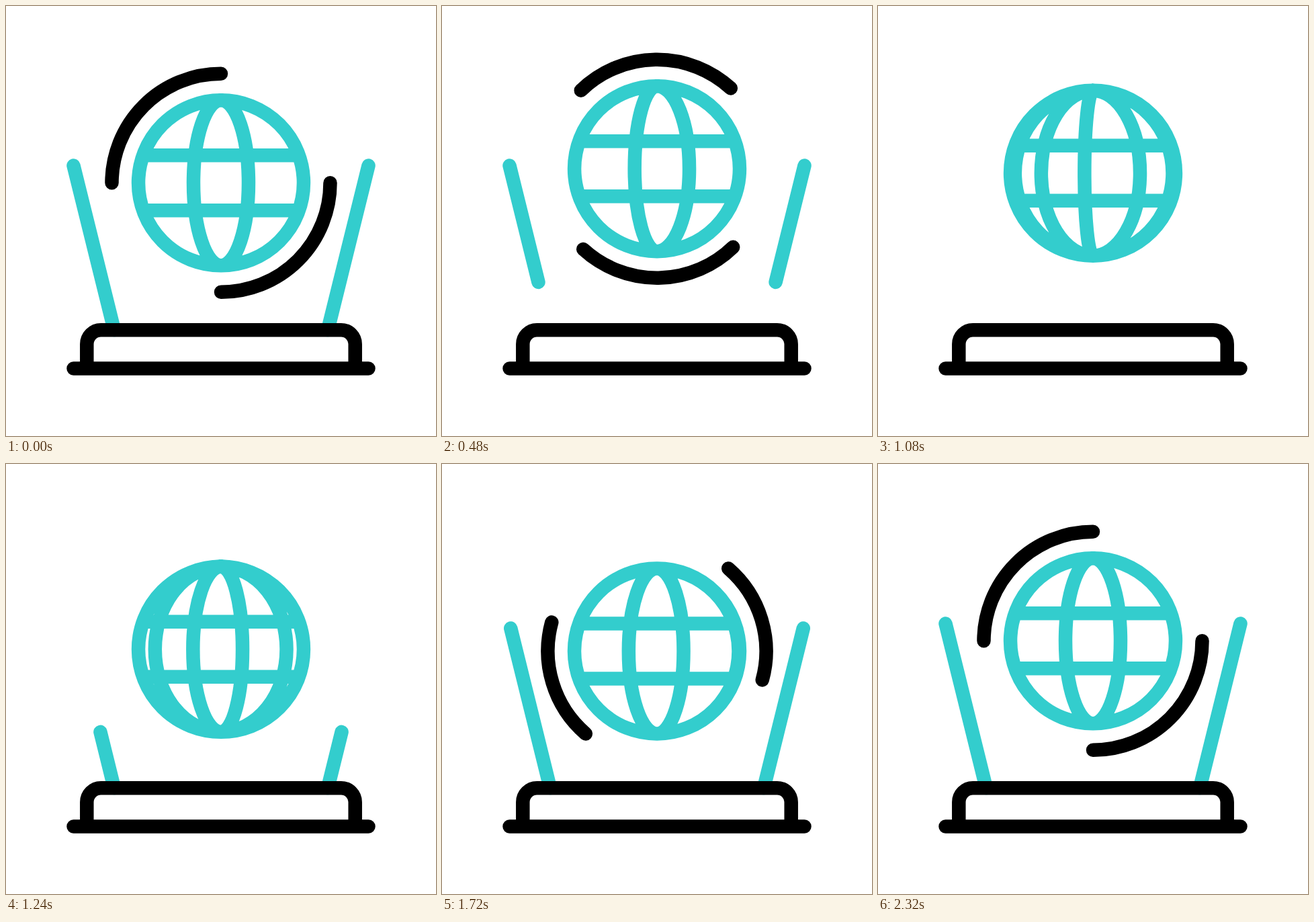
Animation of 640 by 640 pixels, one loop 2440 ms. Source, as an HTML page:

```html
<!DOCTYPE html>
<html lang="en">
<head>
<meta charset="utf-8">
<title>Spinning globe</title>
<style>
  html, body { margin: 0; width: 100%; height: 100%; overflow: hidden; background: #fff; }
  svg { display: block; width: 100vw; height: 100vh; }
  path { fill: none; stroke-width: 20.5; }
  .teal { stroke: #33cdcd; }
  .black { stroke: #000; }
  .round { stroke-linecap: round; }
</style>
</head>
<body>
<svg viewBox="0 0 640 640">
  <path id="rods" class="teal round"/>
  <path id="globe" class="teal"/>
  <path id="orbit" class="black round"/>
  <path class="black round" d="M120.3 539.5V503.5A21 21 0 0 1 141.3 482.3H498.7A21 21 0 0 1 519.7 503.5V539.5M100.5 539.5H539.5"/>
</svg>
<script>
const LOOP = 2440, STEP = 40, LAST = 2320;
const CX = 320, R = 123, ORBIT = 162.5, BAND = R / 3;
const $ = id => document.getElementById(id);
const rad = deg => deg * Math.PI / 180;
const span = (t, a, b) => Math.min(1, Math.max(0, (t - a) / (b - a)));
const smooth = x => x * x * (3 - 2 * x);
const easeIn = x => x ** 3;
const easeOut = x => 1 - (1 - x) ** 3;
const move = (t, from, to, start, end) => from + (to - from) * smooth(span(t, start, end));

// Two meridians leave over the right rim, one crosses, two arrive from the left
const meridians = t => [
  move(t, -BAND, R, 320, 1545),
  move(t, BAND, R, 320, 1205),
  move(t, -R, R, 470, 1780),
  move(t, -R, BAND, 706, 1780),
  move(t, -R, -BAND, 930, 1780)
];

function height(t) {
  if (t < 860) return move(t, 263.3, 225.3, 40, 860);
  return t < 1390 ? move(t, 225.3, 288, 860, 1390) : move(t, 288, 263.3, 1390, 2170);
}

function globePath(t, cy) {
  const top = cy - R, bottom = cy + R, half = Math.sqrt(R * R - BAND * BAND);
  let d = `M${CX} ${top}A${R} ${R} 0 0 1 ${CX} ${bottom}A${R} ${R} 0 0 1 ${CX} ${top}Z`;
  for (const y of [cy - BAND, cy + BAND]) d += `M${CX - half} ${y}H${CX + half}`;
  for (const x of meridians(t)) {
    const rx = Math.max(0.01, Math.abs(x));
    d += `M${CX} ${top}A${rx} ${R} 0 0 ${x > 0 ? 1 : 0} ${CX} ${bottom}`;
  }
  return d;
}

function orbitPath(t, cy) {
  const turn = move(t, 180, 540, 0, 2240);
  const tail = turn + (t < 1200 ? 90 * easeIn(span(t, 200, 1040)) : 0);
  const head = turn + (t < 1200 ? 90 : 90 * easeOut(span(t, 1422, 2290)));
  if (head - tail < 0.01) return "";
  const point = deg =>
    `${CX + ORBIT * Math.cos(rad(deg))} ${cy + ORBIT * Math.sin(rad(deg))}`;
  return [0, 180].map(k =>
    `M${point(tail + k)}A${ORBIT} ${ORBIT} 0 0 1 ${point(head + k)}`).join("");
}

function rodsPath(t) {
  const from = t < 900 ? 0 : 1 - easeOut(span(t, 1130, 1980));
  const to = t < 900 ? 1 - easeIn(span(t, 0, 725)) : 1;
  if (to - from < 0.001) return "";
  const at = (k, side) => `${CX + side * (219.5 - 60.5 * k)} ${237.5 + 244.5 * k}`;
  return [-1, 1].map(s => `M${at(from, s)}L${at(to, s)}`).join("");
}

function draw(t) {
  const cy = height(t);
  $("rods").setAttribute("d", rodsPath(t));
  $("globe").setAttribute("d", globePath(t, cy));
  $("orbit").setAttribute("d", orbitPath(t, cy));
}

const start = performance.now();
function tick() {
  const t = (performance.now() - start) % LOOP;
  draw(Math.min(LAST, Math.floor(t / STEP) * STEP));
  requestAnimationFrame(tick);
}
draw(0);
requestAnimationFrame(tick);
</script>
</body>
</html>
```
